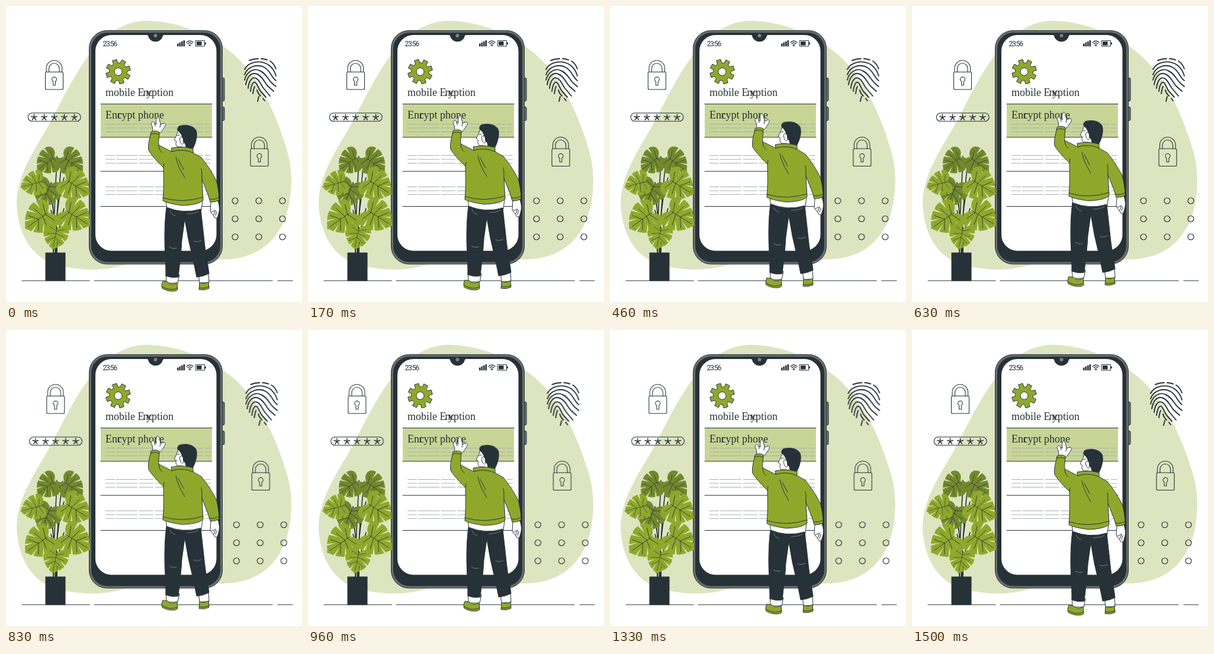
These frames come from a looping animation (500x500 px, 1.54 s). An HTML page:

```html
<!DOCTYPE html>
<html lang="en">
<head>
<meta charset="utf-8">
<title>Mobile encryption</title>
<style>
html, body { margin: 0; width: 100%; height: 100%; overflow: hidden; background: #fff; }
svg { display: block; width: 100vw; height: 100vh; }
:root { --dark: #263238; --green: #8fa82c; --deep: #71892c; }
.line { fill: none; stroke: var(--dark); stroke-linecap: round; stroke-linejoin: round; }
.ink { stroke: var(--dark); stroke-linejoin: round; }
.dark { fill: var(--dark); }
.green { fill: var(--green); }
.deep { fill: var(--deep); }
.skin { fill: #fff; }
.rows { stroke: #a9aeae; stroke-width: 1; }
.label { font: 18px "Liberation Serif", serif; fill: var(--dark); }
.clock { font: 400 12px Roboto, sans-serif; letter-spacing: -1.3px; fill: var(--dark); }

/* 37 drawings per loop; steps() holds each one */
#man, #icons { animation: 1540ms linear -4ms infinite; }
#man { animation-name: lift; }
#icons { animation-name: shake; }
@keyframes lift {
  0% { transform: translateY(0); animation-timing-function: steps(18); }
  48.65% { transform: translateY(-9.5px); animation-timing-function: steps(18); }
  97.3%, 100% { transform: translateY(0); }
}
@keyframes shake {
  0% { transform: translateX(0); animation-timing-function: steps(4); }
  10.81% { transform: translateX(-1px); animation-timing-function: steps(3); }
  18.92% { transform: translateX(2px); animation-timing-function: steps(3); }
  27.03% { transform: translateX(-4.5px); animation-timing-function: steps(1); }
  29.73% { transform: translateX(-2.2px); animation-timing-function: steps(2); }
  35.13% { transform: translateX(3.8px); animation-timing-function: steps(2); }
  40.54% { transform: translateX(4px); animation-timing-function: steps(3); }
  48.65% { transform: translateX(-4px); animation-timing-function: steps(2); }
  54.05% { transform: translateX(2.3px); animation-timing-function: steps(2); }
  59.46% { transform: translateX(4px); animation-timing-function: steps(3); }
  67.57% { transform: translateX(-4px); animation-timing-function: steps(1); }
  70.27% { transform: translateX(-1.1px); animation-timing-function: steps(3); }
  78.38% { transform: translateX(3.5px); animation-timing-function: steps(3); }
  86.49% { transform: translateX(-.7px); animation-timing-function: steps(4); }
  97.3%, 100% { transform: translateX(0); }
}
</style>
</head>
<body>
<svg viewBox="0 0 500 500">
  <defs>
    <g id="leaf">
      <path d="M2 0C-8-4-12-16-4-23C-1-25 2-26 5-26L6-12 9-26C14-26 18-25 22-22L15-9 25-21C30-18 33-15 36-11L24-5 38-9C40-5 42-2 44 0C42 2 40 5 38 9L24 5 36 11C33 15 30 18 25 21L15 9 22 22C18 25 14 26 9 26L6 12 5 26C2 26-1 25-4 23C-12 16-8 4 2 0Z"/>
      <path class="line" stroke-width=".7" d="M-2 0H38M5 0L-1-15M5 0L-1 15M10 0L14-17M10 0L14 17M18 0L28-14M18 0L28 14"/>
    </g>
    <g id="lock">
      <rect x="66.500" y="111.500" width="30" height="29.500" rx="2"/>
      <path d="M68 111.500V105A13.300 13 0 0 1 94.600 105V111.500M72.500 111.500V105.500A8.800 8.800 0 0 1 90.100 105.500V111.500"/>
      <path d="M79.500 127.300A4 4 0 1 1 83.500 127.300L83.300 134H79.700Z"/>
    </g>
    <path id="star" d="M0 0V-5M0 0L4.800-1.500M0 0L3.100 4.500M0 0L-3.100 4.500M0 0L-4.800-1.500"/>
    <g id="dots"><circle cx="387" r="5"/><circle cx="427" r="5"/><circle cx="467" r="5"/></g>
    <path id="copy" d="M168 0H346M168 6.500H346M168 13H346" stroke-dasharray="16 2 36 3 24 3"/>
  </defs>

  <path fill="#dde5c0" d="M236 25C290 25 345 48 385 82C428 120 455 180 472 235C484 270 484 305 478 335C470 378 440 428 366 428C310 430 250 418 200 437C160 450 110 447 72 432C35 415 18 372 18 330C20 285 45 248 70 205C92 166 112 118 146 75C168 45 205 25 236 25Z"/>
  <path class="line" stroke-width="1.200" stroke-linecap="butt" d="M27 464H141M149 464H450M459 464H484"/>

  <g id="phone">
    <path class="ink" fill="#6a6d6e" d="M364 121.500H367Q369 121.500 369 123.500V158.500Q369 160.500 367 160.500H364ZM364 170.500H367Q369 170.500 369 172.500V191.500Q369 193.500 367 193.500H364Z"/>
    <rect class="ink" x="140.500" y="41.500" width="225" height="394.500" rx="30" fill="#6a6d6e"/>
    <rect class="dark" x="144" y="45" width="218" height="387.500" rx="27"/>
    <rect x="151" y="49" width="204.500" height="364.500" rx="27" fill="#fff"/>
    <path class="dark" d="M236 48C241 49 240 52 242 55C247 62 258 62 263 55C265 52 264 49 269 48Z"/>
    <circle cx="252.500" cy="50" r="3" fill="#7d8081"/>
    <text class="clock" x="163.500" y="68.300">23:56</text>
    <path class="dark" d="M289 63.500h2.600v4.800h-2.600zM292.500 61.500h2.600v6.800h-2.600zM296 59.800h2.600v8.500h-2.600zM299.500 58h2.600v10.300h-2.600z"/>
    <path class="line" stroke-width="1.400" d="M305 61.500Q310.500 56.500 316 61.500M307 63.800Q310.500 60.800 314 63.800M309 66Q310.500 64.800 312 66"/>
    <circle class="dark" cx="310.500" cy="67.300" r="1"/>
    <rect class="line" x="320.500" y="58.500" width="15" height="9.500"/>
    <path class="dark" d="M322 60h8.500v6.500h-8.500zM336 61.500h1.800v3.500h-1.800z"/>
    <path id="gear" class="ink green" fill-rule="evenodd"/>
    <rect x="160" y="165.500" width="188" height="56" fill="#c8d597"/>
    <g class="rows">
      <use href="#copy" y="199.500"/><use href="#copy" y="252.500"/><use href="#copy" y="305.500"/>
    </g>
    <path class="line" stroke-width="1.100" d="M160 165.500H348M160 221.700H348M160 279.200H348M160 338.500H348"/>
    <text class="label" y="152"><tspan x="168">mobile E</tspan><tspan x="231.500">nc</tspan><tspan x="237">yption</tspan></text>
    <text class="label" y="190"><tspan x="168">Enc</tspan><tspan x="188">r</tspan><tspan x="195.500">ypt phone</tspan></text>
  </g>

  <g id="plant">
    <path class="line" stroke-width="1.600" d="M80 420C79 380 84 310 86 254M84 420C84 360 90 300 95 256M80 420C84 370 78 330 76 298M80 420C84 360 80 310 62 296M85 420C83 370 88 320 98 290M80 420C82 395 84 370 76 345M86 420C86 390 90 365 98 342M83 420C83 400 87 390 86 374"/>
    <g class="deep">
      <use href="#leaf" transform="translate(82 255) rotate(142) scale(.85)"/>
      <use href="#leaf" transform="translate(98 256) rotate(36) scale(.9)"/>
      <use href="#leaf" transform="translate(75 301) rotate(112) scale(.95)"/>
    </g>
    <g class="green">
      <use href="#leaf" transform="translate(59 297) rotate(165) scale(.82)"/>
      <use href="#leaf" transform="translate(102 294) rotate(32) scale(1.050)"/>
      <use href="#leaf" transform="translate(71 349) rotate(145) scale(1.080)"/>
      <use href="#leaf" transform="translate(102 346) rotate(32) scale(1.080)"/>
      <use href="#leaf" transform="translate(86 376) rotate(102) scale(.82)"/>
    </g>
    <rect class="dark" x="66.500" y="416.500" width="34" height="48"/>
  </g>

  <g id="icons" class="line" stroke-width="1.100">
    <use href="#lock"/>
    <use href="#lock" x="346.500" y="129.500"/>
    <rect x="37.200" y="180.800" width="89" height="14" rx="7"/>
    <g stroke-width="1.500">
      <use href="#star" x="47.500" y="188"/><use href="#star" x="64.500" y="188"/><use href="#star" x="81.500" y="188"/><use href="#star" x="98.500" y="188"/><use href="#star" x="115.500" y="188"/>
    </g>
    <g stroke-width="1.200">
      <use href="#dots" y="329"/><use href="#dots" y="359.500"/><use href="#dots" y="390"/>
    </g>
    <path stroke-width="1.900" d="M411 92C416 90 421 89 426 89M431 89C435 89 438 90 441 91M446 93C451 96 454 101 456 106M403 107C409 95 428 90 443 99C450 104 454 111 456 118M403 116C408 102 425 97 437 104C447 110 448 120 456 126M403 125C406 112 418 104 428 109C440 114 442 124 450 131L456 136M405 133C407 120 414 111 424 115C434 119 436 129 443 136L452 144M409 139C410 128 415 119 422 122C428 124 430 133 435 139L446 152M413 144C414 135 417 127 421 129C425 132 426 139 430 144L439 154M417 148C418 144 418 140 420 136M424 142C425 147 427 149 430 152M434 156L437 160M427 153L425 161"/>
  </g>

  <g id="man" class="ink">
    <path class="skin" d="M247 215C249 208 247 203 245 199C246 195 249 194 251 198L254 200C253 194 254 188 256 187C259 188 260 195 261 200L267 198C271 199 269 203 266 207C264 211 261 213 259 216Z"/>
    <path class="line" d="M251 198L252 203M261 200L260 205"/>
    <path class="skin" d="M346 331L358 329C361 338 361 345 359 351L357 358 353 358 350 353 345 347Z"/>
    <path class="line" d="M347 348L354 345 351 353M356 347L354 354"/>
    <path class="skin" d="M270 452L271 464 268 468 290 468 293 454ZM325 452L327 468 343 467 342 450Z"/>
    <path class="green" d="M265 465C262 471 263 475 264 477C274 483 287 483 290 479L289 467C284 471 277 471 273 466ZM327 467L326 479Q335 481 343 477L342 466Q335 470 327 467Z"/>
    <path class="line" d="M264 474C273 480 284 480 290 476M327 476Q335 478 343 474"/>
    <path class="skin" d="M270 329L272 343Q300 352 330 345L332 328Z"/>
    <path class="dark" d="M271 340Q300 352 329 343C331 362 333 378 335 398C337 418 341 435 343 452Q333 457 322 458C318 436 312 412 308 394L302 360 297 396C296 418 293 438 291 458Q280 460 270 456C270 430 268 415 268 392C268 372 269 355 271 340Z"/>
    <path class="line" style="stroke:#8d9699" stroke-width=".8" d="M277 346Q278 352 286 354M325 347Q318 351 306 351M276 407Q282 411 288 409M317 397Q323 400 330 396"/>
    <path class="skin" d="M292 206C290 213 288 220 284 226L288 229C286 232 287 236 290 238L298 238 298 246 313 246 310 222Z"/>
    <path class="dark" d="M290 210C289 205 292 202 297 202C306 200 317 203 321 210C324 218 321 232 315 242C307 243 303 239 303 233C300 231 299 226 298 223C297 217 294 213 290 210Z"/>
    <path class="skin" d="M299 223C295 219 292 223 294 228C295 233 298 235 300 232Z"/>
    <path class="line" d="M289 219L293 218"/>
    <path class="green" d="M245 213Q252 209 259 213C259 221 257 229 258 235L280 246 279 240Q298 236 316 241L316 248 330 256C339 267 351 285 356 297C358 307 360 318 360 328Q353 332 345 331L341 318 331 293 333 328Q326 336 298 337Q275 334 265 329C267 305 266 290 266 273C257 264 247 254 241 244C239 234 243 224 245 213Z"/>
    <path class="line" d="M280 246Q298 240 316 248M244 217Q251 213 258 217M265 324Q298 334 333 323M331 293C331 286 331 280 330 275M287 255C290 270 296 280 302 290M291 259L300 276M258 235C258 241 260 245 264 248M344 326Q352 328 360 323M266 273L267 266"/>
  </g>
</svg>
<script>
// Cog outline: each tooth is a pair of root and tip corners
const TEETH = 8;
const at = (r, a) => `${(189.5 + r * Math.sin(a)).toFixed(1)} ${(111 - r * Math.cos(a)).toFixed(1)}`;
const corners = [];
for (let i = 0; i < TEETH; i++) {
  const mid = 0.48 + i * 2 * Math.PI / TEETH;
  corners.push(at(15, mid - .26), at(21, mid - .18), at(21, mid + .18), at(15, mid + .26));
}
document.getElementById('gear').setAttribute('d',
  `M${corners.join('L')}ZM196 111A6.500 6.500 0 1 0 183 111A6.500 6.500 0 1 0 196 111Z`);
</script>
</body>
</html>
```
